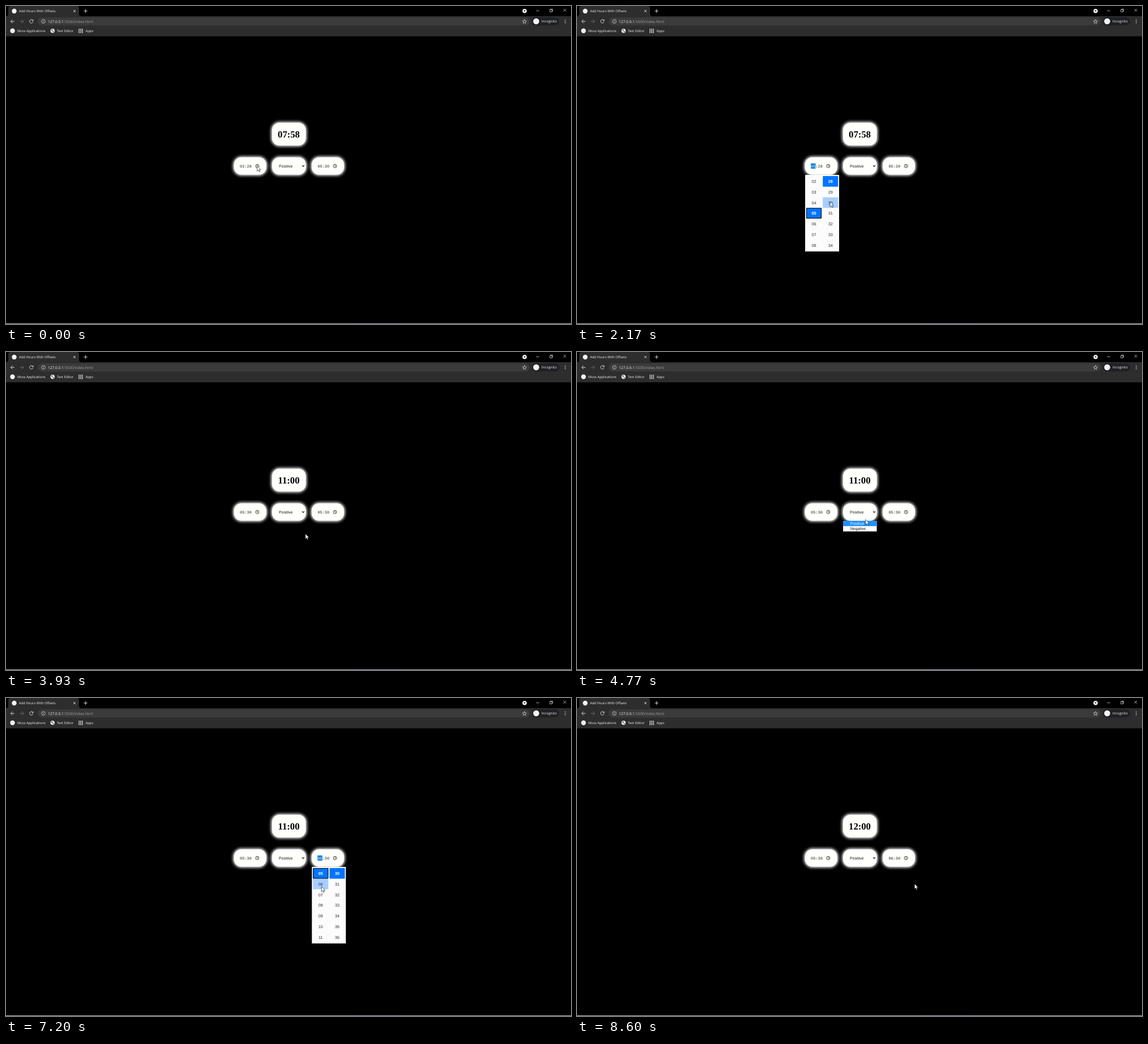
An HTML page that plays this animation: 998x561 px, repeating every 8.63 s.

```html
<!DOCTYPE html>
<html lang="en">
<head>
<meta charset="utf-8">
<title>Time calculator</title>
<style>
  html, body { margin: 0; width: 100%; height: 100%; overflow: hidden; background: #000; }
  svg { display: block; width: 100vw; height: 100vh; text-rendering: geometricPrecision; }
  text { white-space: pre; }
  .ui { font: 5.9px "Open Sans", "Noto Sans", sans-serif; fill: #f1f1f1; }
  .line { fill: none; stroke: #e8e8e8; stroke-width: .9; }
  .form { font: 6.93px "Liberation Sans", Arial, sans-serif; fill: #111; }
  .time { font: 6.93px "Liberation Mono", monospace; fill: #222; }
  .result { font: bold 16.7px "Liberation Serif", Times, serif; fill: #000; text-anchor: middle; }
  .cell { font: 7.3px "Liberation Sans", Arial, sans-serif; fill: #333; text-anchor: middle; }
  .cell.on { font-weight: bold; fill: #fff; }
</style>
</head>
<body>
<svg viewBox="0 0 998 561" preserveAspectRatio="none">
  <defs>
    <filter id="blur" x="-30%" y="-50%" width="160%" height="200%"><feGaussianBlur stdDeviation="2.5"/></filter>
  </defs>
  <rect width="998" height="561" fill="#000"/>

  <!-- Browser frame -->
  <path d="M0 18q4 0 4-4V4q0-4 4-4h117q4 0 4 4v10q0 4 4 4h865v35.5H0z" fill="#2d2d2d"/>
  <rect x="56" y="20" width="869" height="14.4" rx="7.2" fill="#3b3b3b"/>
  <rect x="929" y="20" width="48" height="14.4" rx="7.2" fill="#202124"/>
  <g fill="#f4f4f4">
    <circle cx="14.5" cy="9" r="4.2"/>
    <circle cx="11.5" cy="43.8" r="4.2"/>
    <circle cx="82.2" cy="43.8" r="3.7"/>
    <circle cx="916" cy="8.8" r="3.8"/>
    <circle cx="936.5" cy="27" r="5.3"/>
  </g>
  <path d="M79.6 42.4l2-1.4 1.2 1-1.4 1.9zM82.4 44.2l2.3.3-.9 1.8-1.4-.5z" fill="#444"/>
  <path d="M914.2 7.8h3.6l-1.8 2.2z" fill="#000"/>
  <g class="ui">
    <text x="23" y="11">Add Hours With Offsets</text>
    <text x="20" y="46">Moss Applications</text>
    <text x="90" y="46">Text Editor</text>
    <text x="140.5" y="46">Apps</text>
    <text x="74" y="29.6" font-size="6.6" style="font-size:6.6px">127.0.0.1<tspan fill="#a0a0a0">:5500/index.html</tspan></text>
    <text x="946" y="29.3" style="font-size:6.2px">Incognito</text>
  </g>
  <g class="line">
    <path d="M119 7l3.8 3.8m0-3.8L119 10.800M137.400 8.900h6.400m-3.200-3.200v6.400"/>
    <path d="M15 27.200H8.300m3.200-3.200-3.200 3.200 3.200 3.200"/>
    <path d="M24.500 27.200h6.700m-3.200-3.200 3.200 3.200-3.200 3.200" stroke="#777" style="stroke:#707070"/>
    <path d="M47.300 25.200a3.100 3.100 0 1 0 .4 3M48 23.800v2.400h-2.400"/>
    <g style="stroke-width:.7">
      <circle cx="66" cy="27.200" r="3.300"/>
      <path d="M66 26.600v2.300M66 25.100v.8"/>
      <path d="M915.800 23.700l1 2.500 2.600.2-2 1.700.6 2.500-2.200-1.400-2.200 1.400.600-2.500-2-1.700 2.600-.2z"/>
      <path d="M936.500 8.500h5M960.600 6.700h3.700v3.700h-3.700zM961.800 6.600V5.400h3.800v3.800h-1.200M984.500 5l4.800 4.800m0-4.800-4.800 4.800"/>
    </g>
  </g>
  <g id="dots" fill="#e8e8e8"></g>
  <path d="M0 560.500H998" stroke="#bdbdbd"/>
  <path d="M613 560.500h80" stroke="#b9b6d0"/>

  <!-- Page -->
  <g id="cards"></g>
  <g id="live"></g>
  <path id="cursor" d="M0 0v9.300l2.100-1.900 1.500 3.200 1.500-.7-1.500-3.100h2.900z" fill="#fff" stroke="#000" stroke-width=".6"/>
</svg>
<script>
const LOOP = 8630;
const FIRST_X = 403, SECOND_X = 540.3, LIST_Y = 298, ROW = 18.75;
const $ = id => document.getElementById(id);
const pad = n => String(n).padStart(2, "0");

const rect = (x, y, w, h, fill, extra = "") =>
  `<rect x="${x}" y="${y}" width="${w}" height="${h}" fill="${fill}" ${extra}/>`;
const text = (x, y, cls, s, extra = "") =>
  `<text x="${x}" y="${y}" class="${cls}" ${extra}>${s}</text>`;

// Pointer stops: time, x, y
const path = [
  [0, 443.6, 282], [450, 443.6, 282], [930, 416, 365], [1350, 416, 365],
  [2000, 447, 345], [2450, 447, 345], [3050, 532.8, 339.3], [3700, 532.8, 339.3],
  [4300, 521, 283], [4480, 521, 283], [4700, 509.6, 295.5], [4850, 509.6, 295.5],
  [5050, 503, 301], [5350, 503, 301], [5950, 579.5, 282.3], [6650, 579.5, 282.3],
  [7150, 557.7, 333.7], [7300, 556, 329], [7550, 556, 329], [8100, 596.2, 327.7], [LOOP, 596.2, 327.7]
];

const at = {
  openFirst: 400, pickHour: 1200, pickMinute: 2250, closeFirst: 3500,
  openSelect: 4420, closeSelect: 5230,
  openSecond: 6500, pickSecond: 7450, closeSecond: 8300
};

function pointer(t) {
  const i = Math.max(1, path.findIndex(p => p[0] > t));
  const [t0, x0, y0] = path[i - 1], [t1, x1, y1] = path[i];
  const u = (t - t0) / (t1 - t0), k = u * u * (3 - 2 * u);
  return [x0 + (x1 - x0) * k, y0 + (y1 - y0) * k];
}

function card(x, y, w, h) {
  return rect(x - 1.5, y - 1.5, w + 3, h + 3, "#fff", 'rx="14.5" filter="url(#blur)"')
    + rect(x, y, w, h, "#fffffc", 'rx="13"');
}

function clock(cx) {
  return `<g fill="none" stroke="#111" stroke-width=".8"><circle cx="${cx}" cy="282.3" r="3"/>`
    + `<path d="M${cx} 280.3v2.200l1.500 .9"/></g>`;
}

function timeField(x, hour, minute, focused) {
  const left = x + 10;
  return (focused ? rect(left, 277.8, 8.5, 9, "#0078d7") : "")
    + text(left + .1, 284.700, "time", `<tspan${focused ? ' fill="#fff"' : ""}>${pad(hour)}</tspan>:${pad(minute)}`)
    + clock(x + 40.8);
}

// Two columns of seven values; focus is the index of the outlined column
function timeList(x, starts, chosen, focus, [px, py]) {
  let out = rect(x, LIST_Y, 60, 135, "#fcfcfd");
  starts.forEach((start, col) => {
    const left = x + 2 + col * 29.2;
    for (let row = 0; row < 7; row++) {
      const value = start + row, top = LIST_Y + 2 + row * ROW;
      const on = value === chosen[col];
      const hover = px >= left && px < left + 27 && py >= top && py < top + ROW;
      if (on) out += rect(left, top, 27, 18.7, "#0075ff", 'rx=".8"');
      else if (hover) out += rect(left, top, 27, 18.7, "#a9cdff");
      if (on && focus === col)
        out += rect(left + .5, top + .5, 26, 17.7, "none", 'rx=".8" stroke="#101010" stroke-width="1.200"');
      out += text(left + 13.5, top + 12, on ? "cell on" : "cell", pad(value));
    }
  });
  return out;
}

function optionList([, py]) {
  const active = py > 307.200 ? 1 : 0;
  return rect(470, LIST_Y, 59.5, 18.5, "#fff")
    + rect(470, LIST_Y + active * 9.200, 59.5, 9.200, "#1e90ff")
    + ["Positive", "Negative"].map((label, i) =>
      text(482.8, 304.700 + i * 9, "form", label, i === active ? 'style="fill:#fff"' : "")).join("");
}

function draw(t) {
  const mouse = pointer(t);
  const during = (a, b) => t >= a && t < b;
  const hour = t < at.pickHour ? 2 : 5, minute = t < at.pickMinute ? 28 : 30;
  const hour2 = t < at.pickSecond ? 5 : 6;
  const first = during(at.openFirst, at.closeFirst);
  const second = during(at.openSecond, at.closeSecond);
  const result = t < at.closeFirst ? "07:58" : t < at.closeSecond ? "11:00" : "12:00";

  let out = text(499.5, 231.500, "result", result)
    + timeField(FIRST_X, hour, minute, first)
    + timeField(SECOND_X, hour2, 30, second);
  if (first) out += timeList(FIRST_X, [2, 28], [hour, minute], t < at.pickMinute ? 0 : 1, mouse);
  if (during(at.openSelect, at.closeSelect)) out += optionList(mouse);
  if (second) out += timeList(SECOND_X, [5, 30], [hour2, 30], 0, mouse);
  $("live").innerHTML = out;
  $("cursor").setAttribute("transform", `translate(${mouse})`);
}

$("cards").innerHTML = card(470, 206, 59.5, 40) + card(402.7, 267, 57, 30.5)
  + card(470, 267, 59.700, 30.5) + card(540, 267, 57, 30.5)
  + text(482, 284.500, "form", "Positive")
  + '<path d="M523 281.200l2 2 2-2" fill="none" stroke="#111" stroke-width="1.100"/>';

let dots = "";
for (let i = 0; i < 9; i++) dots += rect(128.2 + i % 3 * 2.900, 40.300 + Math.floor(i / 3) * 2.700, 1.800, 1.800, "#e8e8e8");
for (let i = 0; i < 3; i++) dots += `<circle cx="987.800" cy="${24.6 + i * 2.600}" r=".75"/>`;
$("dots").innerHTML = dots;

const start = performance.now();
function tick() {
  draw((performance.now() - start) % LOOP);
  requestAnimationFrame(tick);
}
tick();
</script>
</body>
</html>
```
